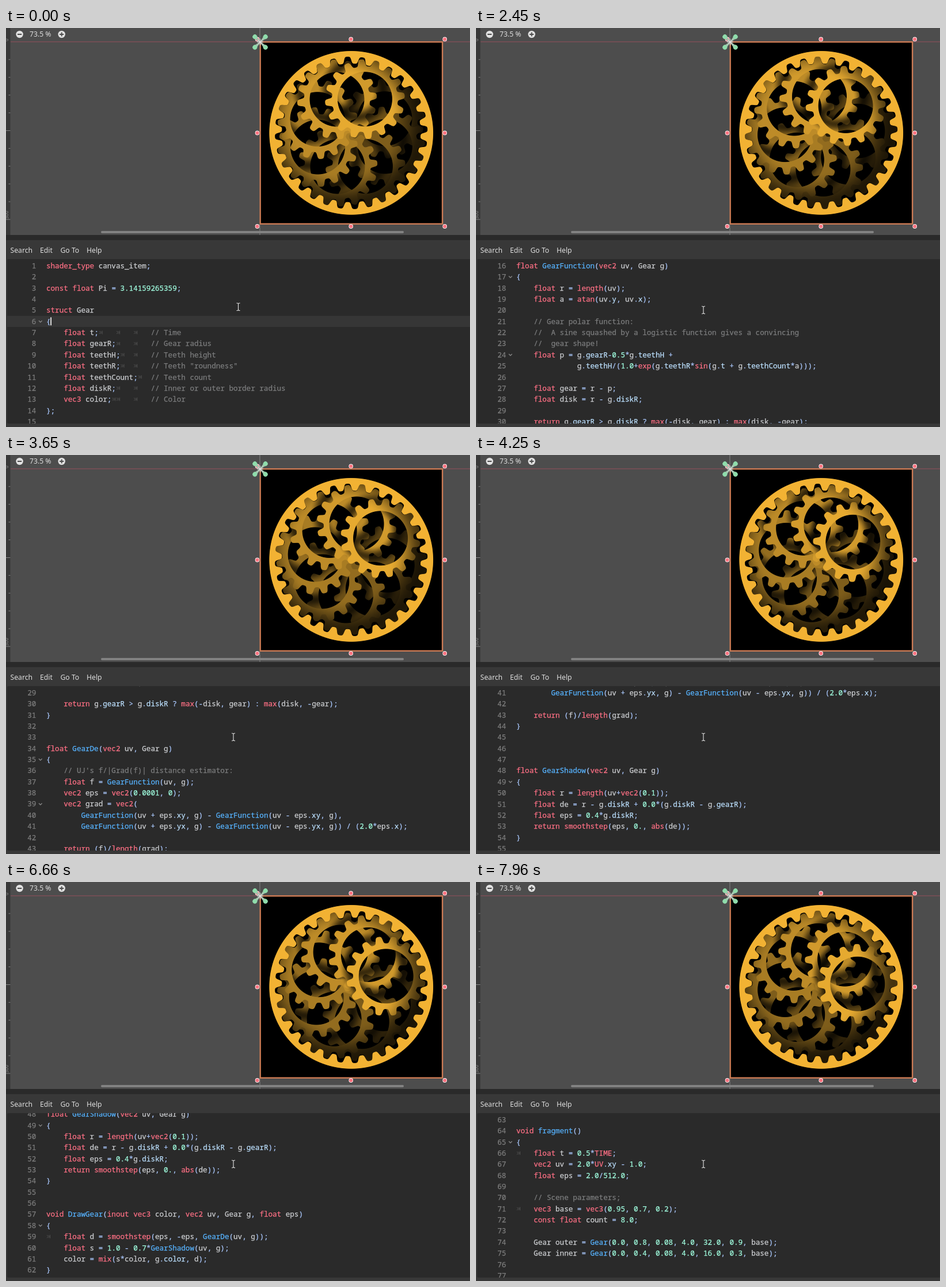
An HTML page with a canvas for the animation above (8 s loop, 806 by 694 pixels).

```html
<!DOCTYPE html>
<html lang="en">
<head>
<meta charset="utf-8">
<title>Gear shader in an editor</title>
<style>
html, body { margin: 0; width: 100%; height: 100%; overflow: hidden; background: #4d4d4d; }
canvas { position: absolute; left: 441px; top: 24px; }
svg { position: absolute; left: 0; top: 0; display: block; }
.ui { font: 12.2px "Noto Sans", "Open Sans", sans-serif; fill: #dedede; }
.code text {
  font: 12.6px "Noto Sans Mono", "DejaVu Sans Mono", monospace;
  white-space: pre; font-variant-ligatures: none;
  fill: currentColor; stroke: currentColor; stroke-width: 0.25;
}
.num { color: #7e7e7e; text-anchor: end; }
.word { color: #cdcfd2; }
.key { color: #ff7085; }
.func { color: #57b3ff; }
.digit { color: #a1ffe0; }
.sym { color: #abc9ff; }
.member { color: #bce0ff; }
.note { color: #7c7d7e; }
.mark { fill: none; stroke: #505050; stroke-width: 1; }
.fold { fill: none; stroke: #858585; stroke-width: 1.4; }
</style>
</head>
<body>
<canvas id="gears" width="318" height="317"></canvas>
<svg width="806" height="694" viewBox="0 0 806 694">
  <defs><clipPath id="pane"><rect x="2" y="402" width="804" height="286"/></clipPath></defs>

  <rect width="7.5" height="360" fill="#383838"/>
  <g id="ruler" stroke="#858585"></g>
  <g font-family="Noto Sans, sans-serif" font-size="8" fill="#8c8c8c">
    <text transform="translate(4 23) rotate(-90)">0</text>
    <text transform="translate(4 332) rotate(-90)">500</text>
  </g>
  <path d="M8 24H806" stroke="#94505a"/>
  <path d="M441 0V24M441 341V360" stroke="#858585"/>
  <rect x="441.7" y="24.3" width="316.4" height="316.4" fill="none" stroke="#cb7a54" stroke-width="2.4"/>
  <g id="handles"></g>
  <g id="anchors"></g>
  <path d="M441.5 18.5V30M436 24.3H447M438 21L445 28M445 21L438 28" stroke="#dcdcdc" stroke-width="1.2"/>

  <g fill="#e2e2e2">
    <circle cx="23.6" cy="11" r="6.2"/>
    <circle cx="96.7" cy="11" r="6.2"/>
  </g>
  <path d="M20 11H27.2M93.1 11H100.3M96.7 7.4V14.6" stroke="#4d4d4d" stroke-width="1.9"/>
  <text class="ui" x="41" y="15.3">73.5 %</text>
  <rect x="165" y="353" width="526" height="4" rx="2" fill="#828282"/>

  <rect y="360" width="806" height="9" fill="#2a2a2a"/>
  <rect y="369" width="806" height="325" fill="#383838"/>
  <g class="ui">
    <text x="7.5" y="391">Search</text>
    <text x="59" y="391">Edit</text>
    <text x="94.5" y="391">Go To</text>
    <text x="140" y="391">Help</text>
  </g>
  <rect x="2" y="402" width="806" height="286" rx="2" fill="#2a2a2a"/>
  <g clip-path="url(#pane)">
    <g id="code" class="code"></g>
  </g>
  <path id="mouse" d="M-3 -6.5Q0 -6.5 0 -5Q0 -6.5 3 -6.5M0 -5V5M-3 6.5Q0 6.5 0 5Q0 6.5 3 6.5" fill="none" stroke="#e6e6e6" stroke-width="1.1"/>
</svg>

<script id="shader" type="text/plain">shader_type canvas_item;

const float Pi = 3.14159265359;

struct Gear
{
    float t;			// Time
    float gearR;		// Gear radius
    float teethH;		// Teeth height
    float teethR;		// Teeth "roundness"
    float teethCount;	// Teeth count
    float diskR;		// Inner or outer border radius
    vec3 color;			// Color
};

float GearFunction(vec2 uv, Gear g)
{
    float r = length(uv);
    float a = atan(uv.y, uv.x);

    // Gear polar function:
    //  A sine squashed by a logistic function gives a convincing
    //  gear shape!
    float p = g.gearR-0.5*g.teethH +
              g.teethH/(1.0+exp(g.teethR*sin(g.t + g.teethCount*a)));

    float gear = r - p;
    float disk = r - g.diskR;

    return g.gearR > g.diskR ? max(-disk, gear) : max(disk, -gear);
}


float GearDe(vec2 uv, Gear g)
{
    // UJ's f/|Grad(f)| distance estimator:
    float f = GearFunction(uv, g);
    vec2 eps = vec2(0.0001, 0);
    vec2 grad = vec2(
        GearFunction(uv + eps.xy, g) - GearFunction(uv - eps.xy, g),
        GearFunction(uv + eps.yx, g) - GearFunction(uv - eps.yx, g)) / (2.0*eps.x);

    return (f)/length(grad);
}



float GearShadow(vec2 uv, Gear g)
{
    float r = length(uv+vec2(0.1));
    float de = r - g.diskR + 0.0*(g.diskR - g.gearR);
    float eps = 0.4*g.diskR;
    return smoothstep(eps, 0., abs(de));
}


void DrawGear(inout vec3 color, vec2 uv, Gear g, float eps)
{
	float d = smoothstep(eps, -eps, GearDe(uv, g));
    float s = 1.0 - 0.7*GearShadow(uv, g);
    color = mix(s*color, g.color, d);
}

void fragment()
{
	float t = 0.5*TIME;
    vec2 uv = 2.0*UV.xy - 1.0;
    float eps = 2.0/512.0;

    // Scene parameters;
	vec3 base = vec3(0.95, 0.7, 0.2);
    const float count = 8.0;

    Gear outer = Gear(0.0, 0.8, 0.08, 4.0, 32.0, 0.9, base);
    Gear inner = Gear(0.0, 0.4, 0.08, 4.0, 16.0, 0.3, base);

</script>

<script>
const $ = id => document.getElementById(id);
const LOOP = 8000, PITCH = 19.35, CHAR = 7.56, LEFT = 70;

function add(parent, tag, attrs, text) {
  const el = document.createElementNS("http://www.w3.org/2000/svg", tag);
  for (const k in attrs) el.setAttribute(k, attrs[k]);
  if (text !== undefined) el.textContent = text;
  parent.appendChild(el);
  return el;
}

// Viewport decorations
for (let k = 1; k <= 10; k++) {
  const y = 24 + k * 30.9;
  add($("ruler"), "path", { d: `M${k % 5 ? 4.5 : 0} ${y}H7.5` });
}

function addHandle(cx, cy) {
  add($("handles"), "circle", { cx, cy, r: 4.6, fill: "#000", opacity: 0.29 });
  add($("handles"), "circle", { cx, cy, r: 3.9, fill: "#fefefe" });
  add($("handles"), "circle", { cx, cy, r: 3.1, fill: "#ff7380" });
}
for (const x of [436.5, 599.2, 762.2]) for (const y of [19.5, 182.5, 345]) {
  if (x !== 599.2 || y !== 182.5) addHandle(x, y);
}

for (const turn of [45, 135, 225, 315]) {
  const pin = add($("anchors"), "g", { transform: `translate(441.5 24.4) rotate(${turn})` });
  add(pin, "path", { d: "M2 -1L13 -3V3L2 1Z", fill: "#a3c5ae" });
  add(pin, "circle", { cx: 13, r: 4, fill: "#8fdcab" });
}

// Code listing
const KEYWORDS = new Set(("shader_type const float struct vec2 vec3 void inout return length atan exp sin max abs " +
  "smoothstep mix TIME UV").split(" "));
const FOLDS = new Set([6, 17, 24, 35, 39, 49, 58, 65]);
const TOKEN = /\/\/.*|\.[A-Za-z]\w*|[A-Za-z_]\w*|\d[\d.]*|\s+|[^\s\w]/g;

function kind(tok, next) {
  if (tok.startsWith("//")) return "note";
  if (/^\d/.test(tok)) return "digit";
  if (!/^[A-Za-z_]/.test(tok)) return "sym";
  if (KEYWORDS.has(tok)) return "key";
  return next === "(" ? "func" : "word";
}

function expandTabs(line, y) {
  let out = "";
  for (const ch of line) {
    if (ch !== "\t") { out += ch; continue; }
    const x = LEFT + out.length * CHAR;
    add($("code"), "path", { class: "mark", d: `M${x + 1} ${y - 2.5}l2.5 2.5l-2.5 2.5M${x + 3.5} ${y - 2.5}l2 2.5l-2 2.5M${x + 6.5} ${y - 3}v6` });
    out += " ".repeat(4 - out.length % 4);
  }
  return out;
}

function addLine(line, i) {
  const y = 413.5 + i * PITCH, base = y + 4.5, code = $("code");
  if (i === 5) {
    add(code, "rect", { x: 2, y: y - 9.6, width: 804, height: PITCH, fill: "#363636" });
    add(code, "rect", { x: 77.3, y: y - 7, width: 1.6, height: 14, fill: "#fff" });
  }
  add(code, "text", { class: "num", x: 52.3, y: base }, i + 1);
  if (FOLDS.has(i + 1)) add(code, "path", { class: "fold", d: `M57 ${y - 1.3}l2.8 2.8l2.8 -2.8` });
  const plain = expandTabs(line, y);
  const row = add(code, "text", { x: LEFT, y: base });
  for (const m of plain.matchAll(TOKEN)) {
    const tok = m[0];
    if (/^\.[A-Za-z]/.test(tok)) {
      add(row, "tspan", { class: "sym" }, ".");
      add(row, "tspan", { class: "member" }, tok.slice(1));
    } else {
      add(row, "tspan", { class: kind(tok, plain[m.index + tok.length]) }, tok);
    }
  }
}
$("shader").textContent.split("\n").forEach(addLine);

// Gears: every colour is a multiple of one base, so a single tone per pixel is enough
const BASE = [242.25, 178.5, 51], R = 158.2, CX = 599.7 - 441, CY = 182.4 - 24, EPS = 2 / 512;
const inner = { radius: 0.4, teeth: 16, disk: 0.3, lo: 0.29, hi: 0.45 };
const outer = { radius: 0.8, teeth: 32, disk: 0.9, lo: 0.75, hi: 0.91 };
const ctx = $("gears").getContext("2d");
const W = 318, H = 317, image = ctx.createImageData(W, H);

function smooth(x) {
  x = x < 0 ? 0 : x > 1 ? 1 : x;
  return x * x * (3 - 2 * x);
}

function coverage(u, v, r, g, phase) {
  const a = phase + g.teeth * Math.atan2(v, u);
  const q = Math.exp(4 * Math.sin(a));
  const gear = r - (g.radius - 0.04 + 0.08 / (1 + q));
  const disk = r - g.disk;
  const slope = 0.32 * g.teeth * q * Math.cos(a) / ((1 + q) * (1 + q) * r);
  const side = g.radius > g.disk ? 1 : -1;
  const f = side * gear > -side * disk ? side * gear / Math.sqrt(1 + slope * slope) : -side * disk;
  return smooth((EPS - f) / (2 * EPS));
}

function paint(tone, u, v, g, phase, own) {
  const r = Math.sqrt(u * u + v * v);
  if (tone > 0) {
    const sr = Math.sqrt((u + 0.1) * (u + 0.1) + (v + 0.1) * (v + 0.1));
    tone *= 1 - 0.7 * smooth(1 - Math.abs(sr - g.disk) / (0.4 * g.disk));
  }
  if (r < g.lo || r > g.hi) return tone;
  const d = coverage(u, v, r, g, phase);
  return tone + (own - tone) * d;
}

function drawGears(t) {
  const set = [];
  for (let i = 0; i < 8; i++) {
    const a = t + (i + 1) * Math.PI / 4;
    set.push({ x: 0.4 * Math.cos(a), y: 0.4 * Math.sin(a), tone: 0.35 + 0.6 * i / 7 });
  }
  const px = image.data;
  for (let y = 0, o = 0; y < H; y++) for (let x = 0; x < W; x++, o += 4) {
    const u = (x + 0.5 - CX) / R, v = (y + 0.5 - CY) / R;
    let tone = 0;
    if (u * u + v * v < 0.83) {
      for (const s of set) tone = paint(tone, u + s.x, v + s.y, inner, 16 * t, s.tone);
      tone = paint(tone, u, v, outer, 0, 1);
    }
    for (let c = 0; c < 3; c++) px[o + c] = tone * BASE[c];
    px[o + 3] = 255;
  }
  ctx.putImageData(image, 0, 0);
}

const run = (from, to) => Array.from({ length: (to - from) / 100 + 1 }, (_, i) => from + i * 100);
const TIMES = [0, 20, ...run(50, 250), 390, 590, 820, 1120, ...run(1250, 1850), ...run(1950, 4250),
  4400, 4570, 4770, 5070, 5440, 5940, 5960, ...run(6260, 7960)];
const ANGLE = [[0, 1.955], [33, 2.505], [43, 2.71], [64, 3.06]];
const SCROLL = [[7, 0], [9, 0.7], [12, 3], [21, 15], [33, 28], [39, 40], [43, 45], [46, 45], [51, 47.5], [64, 62]];

function along(keys, n) {
  if (n <= keys[0][0]) return keys[0][1];
  const i = keys.findIndex(k => k[0] >= n);
  const [n0, v0] = keys[i - 1], [n1, v1] = keys[i];
  return v0 + (v1 - v0) * (n - n0) / (n1 - n0);
}

let shown = -1;
function render(ms) {
  let n = TIMES.length - 1;
  while (TIMES[n] > ms) n--;
  if (n === shown) return;
  shown = n;
  drawGears(along(ANGLE, n));
  $("code").setAttribute("transform", `translate(0 ${-along(SCROLL, n) * PITCH})`);
  $("mouse").setAttribute("transform", n < 8 ? "translate(403.5 485)" : "translate(395 490.5)");
}

const start = performance.now();
function tick() {
  render((performance.now() - start) % LOOP);
  requestAnimationFrame(tick);
}
render(0);
requestAnimationFrame(tick);
</script>
</body>
</html>
```
